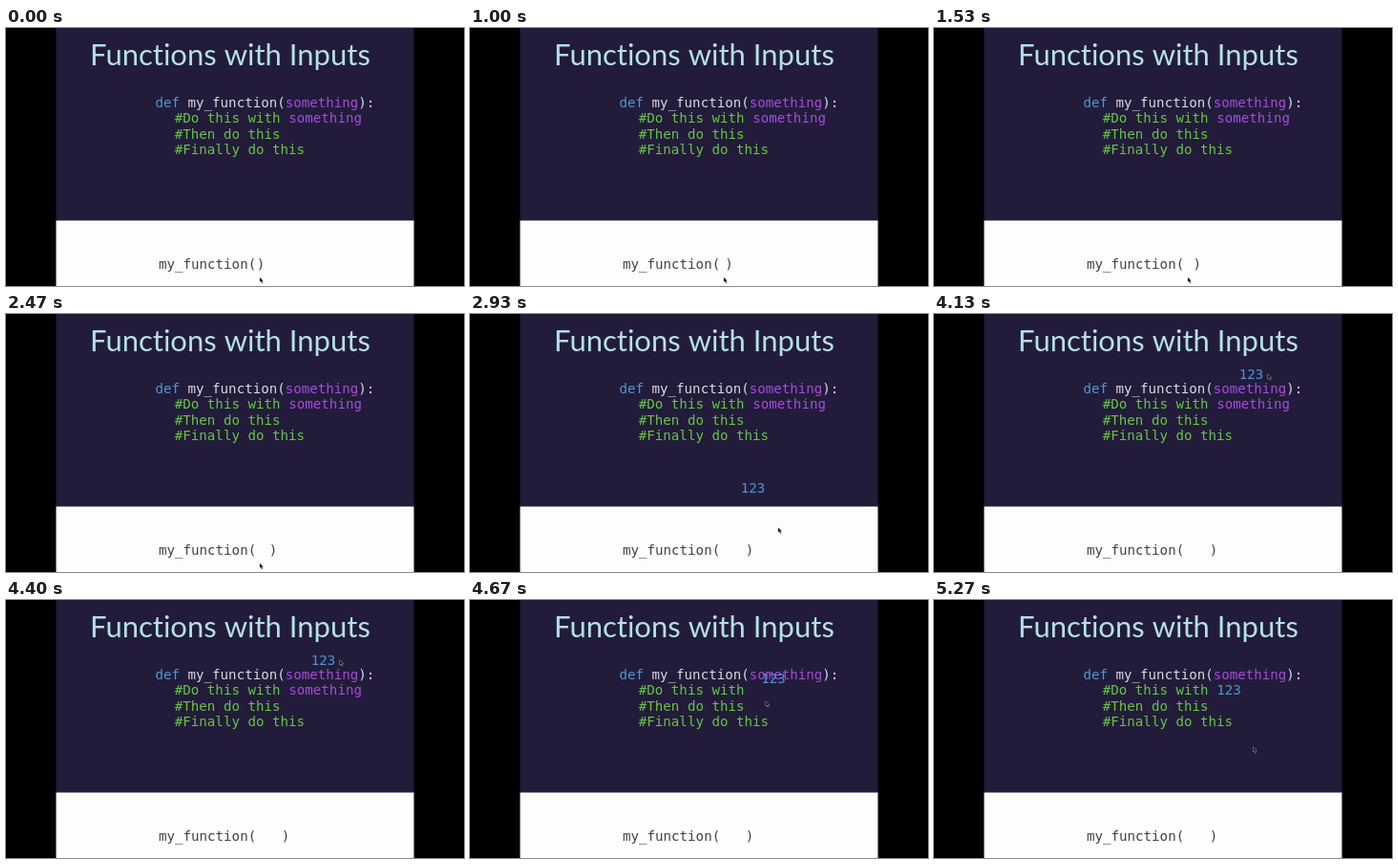
Animation, 480 px wide and 270 px high, one loop 5470 ms. Source, as an HTML page with a canvas:

```html
<!DOCTYPE html>
<html lang="en">
<head>
<meta charset="utf-8">
<title>Functions with Inputs</title>
<style>
html, body { margin: 0; width: 100%; height: 100%; overflow: hidden; background: #000; }
canvas { display: block; width: 480px; height: 270px; }
</style>
</head>
<body>
<canvas id="stage" width="480" height="270"></canvas>
<script>
const LOOP = 5470;
const ctx = document.getElementById('stage').getContext('2d');
const MONO = '14.15px "DejaVu Sans Mono", monospace';
const TITLE = '31px Lato, sans-serif';
const BLUE = '#4f96d6', PURPLE = '#a54ddb', GREEN = '#6ac445', PALE = '#d9d9e3', INK = '#41414a';
const SPACE = 4.3;

const ramp = (t, from, to) => Math.min(1, Math.max(0, (t - from) / (to - from)));
const ease = v => v * v * (3 - 2 * v);

// Moves a point towards a goal between two times; bend > 1 makes y lag behind x
function glide(t, [x, y], from, to, goalX, goalY, bend = 1) {
  const k = ease(ramp(t, from, to));
  return [x + (goalX - x) * k, y + (goalY - y) * k ** bend];
}

function text(str, x, y, color, font = MONO) {
  ctx.font = font;
  ctx.fillStyle = color;
  ctx.fillText(str, x, y);
}

// Draws [string, color] runs one after another
function line(x, y, ...runs) {
  for (const [str, color] of runs) {
    text(str, x, y, color);
    x += ctx.measureText(str).width;
  }
}

function rect(x, y, w, h, color) {
  ctx.fillStyle = color;
  ctx.fillRect(x, y, w, h);
}

function slide() {
  rect(0, 0, 480, 270, '#000');
  rect(52.5, 0, 375, 202, '#221c3a');
  rect(52.5, 201.5, 375, 69, '#fdfdfd');

  ctx.letterSpacing = '0.01px'; // keeps "ti" from joining
  text('Functions with Inputs', 88, 39, '#b5e0e8', TITLE);
  ctx.letterSpacing = '0px';

  line(156.5, 82.5, ['def ', BLUE], ['my_function(', PALE], ['something', PURPLE], ['):', PALE]);
  ['#Do this with', '#Then do this', '#Finally do this']
    .forEach((str, i) => text(str, 176.8, 99 + 16.5 * i, GREEN));
}

function call(t) {
  const typed = Math.floor(3 * ramp(t, 0, 2250)) + Math.floor(3 * ramp(t, 2480, 2690));
  text('my_function(', 160, 252, INK);
  text(')', 160.7 + ctx.measureText('my_function(').width + typed * SPACE, 252, INK);
}

function argument(t) {
  ctx.globalAlpha = 1 - ramp(t, 4400, 4600);
  text('something', 296.3, 99, PURPLE);
  ctx.globalAlpha = 1;

  if (t < 2730) return;
  let p = glide(t, [264, 252], 2730, 3230, 319.7, 68);
  p = glide(t, p, 4400, 4870, 296.3, 99);
  text('123', ...p, BLUE);
}

function pointer(t) {
  let p = glide(t, [266, 261], 2600, 3260, 379.5, 113, 2);
  p = glide(t, p, 3270, 3730, 350, 63);
  p = glide(t, p, 4400, 4670, 310, 106);
  p = glide(t, p, 4680, 5200, 334.5, 154);

  ctx.save();
  ctx.translate(...p);
  const arrow = new Path2D('M0 0V4.6L1.2 3.8L2.2 6L3 5.6L2.2 3.5L3.5 3.4Z');
  ctx.lineWidth = 0.8;
  ctx.strokeStyle = '#c4c4d0';
  ctx.stroke(arrow);
  ctx.fillStyle = '#15151c';
  ctx.fill(arrow);
  ctx.restore();
}

const start = performance.now();
function frame() {
  const t = (performance.now() - start) % LOOP;
  slide();
  call(t);
  argument(t);
  pointer(t);
  requestAnimationFrame(frame);
}
frame();
</script>
</body>
</html>
```
